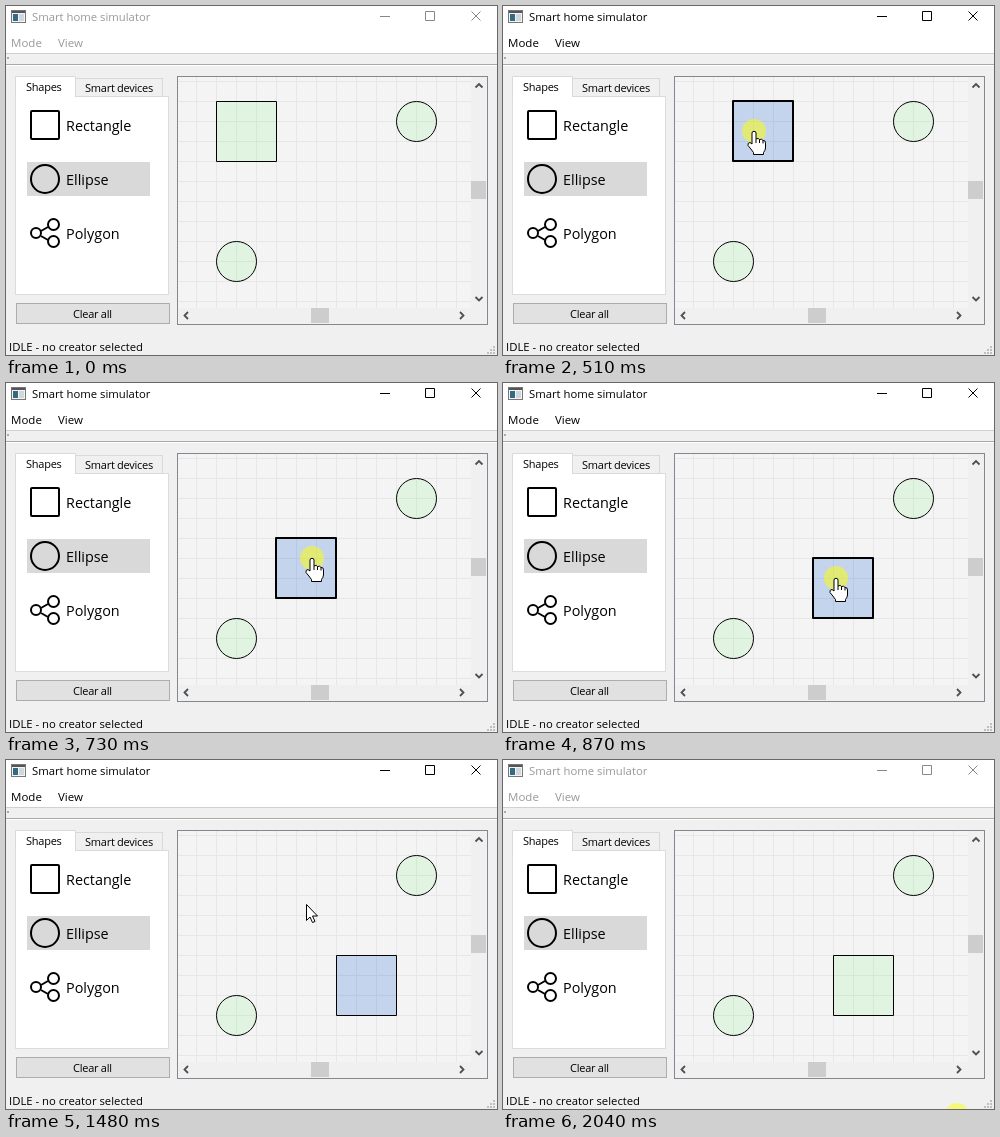
Animation of 491x349 px, one loop 2080 ms. Source, as an HTML page:

```html
<!DOCTYPE html>
<html lang="en">
<head>
<meta charset="utf-8">
<title>Smart home simulator</title>
<style>
  html, body { margin: 0; width: 100%; height: 100%; overflow: hidden; background: #f0f0f0; }
  svg { display: block; width: 491px; height: 349px; }
  text { font: 11.3px "Open Sans", "Noto Sans", sans-serif; }
  .small { font-size: 11px; letter-spacing: -.25px; }
  .menu { font-size: 11.5px; }
  .item { font-size: 14.4px; }
  .line { fill: none; stroke: #000; }
  .shape { fill: rgba(0, 240, 0, .08); stroke: #000; }
  .selected { fill: rgba(25, 95, 205, .22); }
  .chevron { fill: none; stroke: #505050; stroke-width: 1.8; }
  .cursor { fill: #fff; stroke: #000; stroke-linejoin: round; }
  #chrome text { fill: #999; }
  #chrome .line { stroke: #888; }
  #chrome.active text { fill: #000; }
  #chrome.active .line { stroke: #000; }
</style>
</head>
<body>
<svg viewBox="0 0 491 349">
  <rect width="491" height="349" fill="#f0f0f0"/>
  <rect width="491" height="47" fill="#fff"/>

  <!-- Title bar and menu -->
  <rect x="5.5" y="4.5" width="14" height="12" fill="#f4f4f4" stroke="#777"/>
  <rect x="6" y="5" width="13" height="2" fill="#555"/>
  <rect x="7" y="8" width="5" height="7" fill="#346a83"/>
  <rect x="13" y="8" width="5" height="7" fill="#cfd8dc"/>
  <g id="chrome">
    <text x="26" y="15">Smart home simulator</text>
    <text class="menu" x="5" y="41">Mode</text>
    <text class="menu" x="52" y="41">View</text>
    <path class="line" d="M374 10.5H384M419.5 5.5h9v9h-9zM465.500 5.500l9 9m0-9l-9 9"/>
  </g>

  <!-- Empty toolbar -->
  <path d="M0 47.500H491" stroke="#d0d0d0"/>
  <path d="M0 58.500H491" stroke="#a8a8a8"/>
  <path d="M0 59.500H491" stroke="#fff"/>
  <rect x="1" y="51" width="2" height="2" fill="#aaa"/>

  <!-- Shape palette -->
  <rect x="9.500" y="90.500" width="153" height="198" fill="#fff" stroke="#dcdcdc"/>
  <rect x="69.500" y="72.500" width="87" height="18" fill="#f0f0f0" stroke="#d9d9d9"/>
  <path d="M9.500 91V70.500H69.500V91" fill="#fff" stroke="#d9d9d9"/>
  <rect x="10" y="89" width="59" height="4" fill="#fff"/>
  <text class="small" x="20" y="85">Shapes</text>
  <text class="small" x="79" y="86">Smart devices</text>
  <rect x="21" y="156" width="123" height="34" fill="#d9d9d9"/>
  <g class="line" stroke-width="2">
    <rect x="25" y="105" width="28" height="28" rx="1"/>
    <circle cx="39" cy="173" r="14"/>
    <path d="M35 225l7-4M35 230l7 4"/>
    <circle cx="30" cy="227" r="5"/>
    <circle cx="47.500" cy="218.500" r="5.500"/>
    <circle cx="47.500" cy="235.500" r="5.500"/>
  </g>
  <text class="item" x="60" y="125">Rectangle</text>
  <text class="item" x="60" y="179">Ellipse</text>
  <text class="item" x="60" y="233">Polygon</text>
  <rect x="10.500" y="297.500" width="153" height="20" fill="#e1e1e1" stroke="#adadad"/>
  <text class="small" x="67" y="312">Clear all</text>

  <!-- Drawing area -->
  <rect x="171.500" y="70.500" width="310" height="248" fill="#f0f0f0" stroke="#828790"/>
  <rect x="172" y="71" width="293" height="231" fill="#f4f4f4"/>
  <path id="grid" stroke="#e7e7e7"/>
  <rect x="465" y="175" width="15" height="18" fill="#cdcdcd"/>
  <rect x="305" y="302" width="18" height="15" fill="#cdcdcd"/>
  <path class="chevron" d="M469.500 81.500l3.500-3.500 3.500 3.500M469.500 291l3.500 3.500 3.500-3.500M182 306l-3.500 3.500 3.500 3.500M454 306l3.500 3.500-3.500 3.500"/>
  <circle class="shape" cx="410.500" cy="115.500" r="20"/>
  <circle class="shape" cx="230.500" cy="255.500" r="20"/>
  <rect id="square" class="shape" width="60" height="60" stroke-linejoin="round"/>

  <!-- Status bar -->
  <text x="3" y="345">IDLE - no creator selected</text>
  <path d="M487 340h2v2h-2zm0 3h2v2h-2zm0 3h2v2h-2zm-3-3h2v2h-2zm0 3h2v2h-2zm-3 0h2v2h-2z" fill="#bfbfbf"/>

  <!-- Pointer -->
  <g id="pointer">
    <circle id="press" r="12" fill="#ff0" opacity=".5"/>
    <path id="arrow" class="cursor" d="M.5 .5V16.500L4 13L6.500 18.500L9 17.500L6.500 12H11.500Z"/>
    <g id="hand" class="cursor">
      <path d="M-2 13V2Q-2 .3 0 .3T2 2V8Q4.500 6.500 5.500 8.500Q8 7.500 9 9.500Q11.500 9 11.500 12V17Q11.300 19.500 9.500 21.500V23.500H-.5V21.500Q-3 18-6 14.500Q-6.500 11.500-4 11.500Z"/>
      <path d="M2 8v4M5.500 8.500v3.500M9 9.500v3" fill="none"/>
    </g>
  </g>
</svg>
<script>
const LOOP = 2080, STEPS = 45;

// Pointer path: step, x, y
const path = [
  [0, 454, 355], [2, 422, 314], [5, 328, 210], [7, 262, 136], [9, 242, 117],
  [10, 242, 117], [11, 251, 125], [12, 271, 137], [16, 306, 175],
  [20, 342, 202], [23, 360, 211], [27, 360, 211], [29, 340, 187],
  [32, 300, 144], [35, 300, 144], [36, 318, 168], [38, 396, 273],
  [40, 432, 322], [42, 454, 355], [45, 454, 355]
];

const $ = id => document.getElementById(id);
const within = (n, from, to) => n >= from && n < to;
const show = (id, on) => $(id).setAttribute('visibility', on ? 'visible' : 'hidden');
const snap = d => 20 * Math.round(d / 20);

function pointerAt(step) {
  const i = path.findIndex(p => p[0] > step);
  const [s0, x0, y0] = path[i - 1], [s1, x1, y1] = path[i];
  const f = (step - s0) / (s1 - s0);
  return [x0 + (x1 - x0) * f, y0 + (y1 - y0) * f];
}

let lines = '';
for (let x = 190.5; x < 465; x += 20) lines += `M${x} 71V302`;
for (let y = 75.5; y < 302; y += 20) lines += `M172 ${y}H465`;
$('grid').setAttribute('d', lines);

function draw(now) {
  const step = Math.floor((now % LOOP + 10) * STEPS / LOOP) % STEPS;
  const [x, y] = pointerAt(step);

  // The square follows the drag in whole grid cells
  const [dragX, dragY] = pointerAt(Math.min(Math.max(step, 10), 23));
  const left = 210 + snap(dragX - 241), top = 95 + snap(dragY - 117);
  const hover = within(x, left, left + 61) && within(y, top, top + 61);
  const edge = hover ? 0 : .5;
  const square = $('square');
  square.setAttribute('x', left + edge);
  square.setAttribute('y', top + edge);
  square.setAttribute('stroke-width', hover ? 2 : 1);
  square.classList.toggle('selected', within(step, 10, 33));

  $('chrome').classList.toggle('active', within(step, 10, 44));
  $('pointer').setAttribute('transform', `translate(${Math.round(x)} ${Math.round(y)})`);
  show('press', within(step, 10, 27) || within(step, 33, 35) || step === 44);
  show('hand', hover);
  show('arrow', !hover);
}

function tick() {
  draw(performance.now());
  requestAnimationFrame(tick);
}
tick();
</script>
</body>
</html>
```
